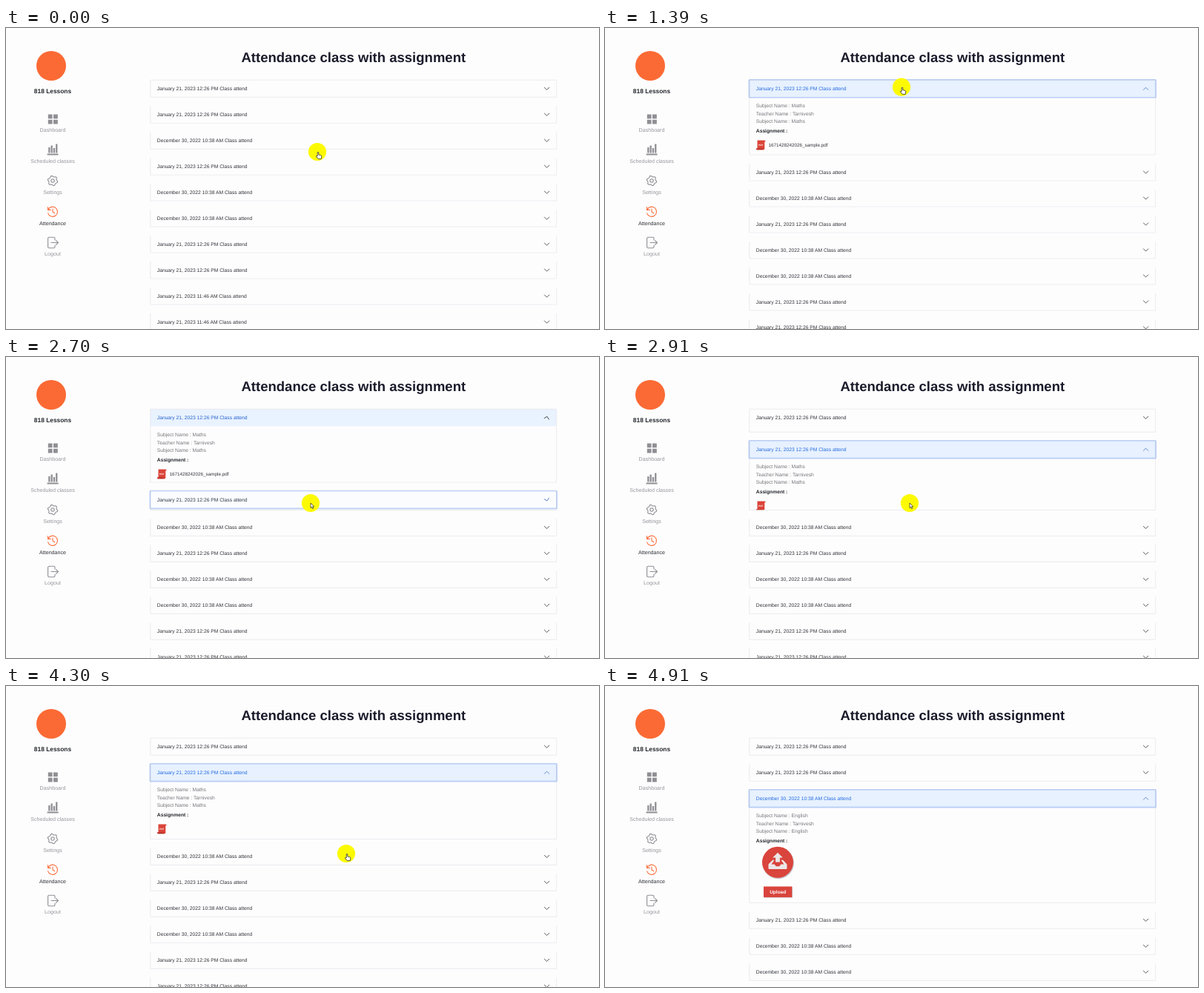
An HTML page that plays this animation: 800 px wide and 406 px high, repeating every 5 s.

```html
<!DOCTYPE html>
<html lang="en">
<head>
<meta charset="utf-8">
<title>Attendance</title>
<style>
  html, body { margin: 0; width: 100%; height: 100%; overflow: hidden; background: #fefdfe; }
  #stage { display: block; width: 100vw; height: 100vh; }
  text { font-family: "Liberation Sans", Arial, sans-serif; font-size: 6.72px; text-rendering: geometricPrecision; }
  .bold { font-weight: bold; fill: #24282c; }
  .mid { text-anchor: middle; }
  .nav text { font-size: 7.14px; text-anchor: middle; fill: #95959a; }
  .nav .active { fill: #2c3034; }
  .solid { fill: #8f8f94; }
  .line { fill: none; stroke: #8f8f94; stroke-width: 1.1; stroke-linecap: round; stroke-linejoin: round; }
  .hot { stroke: #fb6f3c; }
  .border { fill: none; stroke: #e4e4e8; stroke-width: .7; }
  .ring { fill: none; stroke: #2f6fdc; stroke-opacity: .32; stroke-width: 1.6; }
  .chevron { fill: none; stroke-width: .85; stroke-linecap: round; stroke-linejoin: round; }
  .detail { fill: #757579; }
</style>
</head>
<body>
<svg id="stage" viewBox="0 0 800 406">
  <rect width="800" height="406" fill="#fefdfe"/>
  <circle cx="61" cy="51" r="20" fill="#fb6a34"/>
  <text class="bold mid" x="63" y="88" style="font-size:8.4px">818 Lessons</text>
  <text class="bold mid" x="468.8" y="45.8" style="font-size:18.55px;fill:#1b1b2b">Attendance class with assignment</text>

  <g class="nav">
    <path class="solid" d="M56.8 116.5h5.8v5.8h-5.8zM64 116.5h5.8v5.8h-5.8zM56.8 123.7h5.8v5.8h-5.8zM64 123.7h5.8v5.8h-5.8z"/>
    <text x="63" y="140.1">Dashboard</text>
    <path class="solid" d="M55.6 169.6h15v2h-15zM57.2 161h2.3v7.6h-2.3zM60.5 158.5h2.3v10.1h-2.3zM63.8 162h2.3v6.6h-2.3zM67.1 156.5h2.3v12.1h-2.3z"/>
    <text x="63" y="182">Scheduled classes</text>
    <path id="gear" class="line"/>
    <circle class="line" cx="63" cy="206" r="2.2"/>
    <text x="63" y="223.7">Settings</text>
    <path class="line hot" d="M56.8 245.2a6.6 6.6 0 1 1-.2 4.6M56.5 241.6v3.8h3.8M63 244v4l2.8 1.7"/>
    <text class="active" x="63" y="265.5">Attendance</text>
    <path class="line" d="M66 286v-2.2q0-1.6-1.6-1.6h-6.2q-1.6 0-1.6 1.6v11.4q0 1.6 1.6 1.6h6.2q1.6 0 1.6-1.6V293M61 289.5h9.4M67.6 286.7l2.8 2.8-2.8 2.8"/>
    <text x="63" y="307.2">Logout</text>
  </g>

  <g id="list"></g>

  <g id="cursor">
    <circle r="12.1" fill="#fcfa02"/>
    <path id="hand" fill="#fff" stroke="#222" stroke-width=".75" stroke-linejoin="round"
      d="M.2.8q.9-.9 1.6 0V4l3 .7q1.1.3 1 1.5L5.2 9.6H1.3L-1.7 6q.1-1.2 1.9-.1z"/>
    <path id="arrow" fill="#fff" stroke="#222" stroke-width=".7" stroke-linejoin="round"
      d="M0 0v6.6l1.5-1.4 1.1 2.5 1.1-.5-1.1-2.4h2z"/>
  </g>
</svg>

<script>
const $ = id => document.getElementById(id);
const LEFT = 194.8, RIGHT = 742.7, TOP = 70.2, PITCH = 34.97, HEAD = 23.1;
const JAN = "January 21, 2023 12:26 PM", DEC = "December 30, 2022 10:38 AM", EARLY = "January 21, 2023 11:46 AM";
const dates = [JAN, JAN, DEC, JAN, DEC, DEC, JAN, JAN, EARLY, EARLY];

// Clicks by tick of 100 ms; the panels start to move shortly after each
const clicks = [10, 26, 44];
const LAG = 83;
const panelHeights = [78.2, 78.2, 129.1];

const path = [
  [0, 420, 167], [1, 421, 165], [2, 414, 143], [3, 394, 104], [4, 379, 74], [5, 391, 75], [6, 401, 78.5],
  [8, 400, 79.7], [15, 400, 79.7], [16, 403, 96], [17, 409, 128], [18, 412, 153], [19, 412, 171], [21, 412, 190],
  [24, 411, 197], [31, 411, 197], [32, 424, 230], [33, 452, 300], [34, 470, 341], [35, 477, 374], [37, 475, 394],
  [38, 474, 391], [40, 463, 330], [42, 452, 245], [43, 459, 226], [49, 459, 226]
];

const details = subject => `
  <text class="detail" x="203.8" y="13.8">Subject Name : ${subject}</text>
  <text class="detail" x="203.8" y="24.3">Teacher Name : Tarnivesh</text>
  <text class="detail" x="203.8" y="34.9">Subject Name : ${subject}</text>
  <text class="bold" x="203.8" y="47.8">Assignment :</text>`;

const pdf = `
  <path fill="#db4338" d="M205.5 58.2h10q1.3 0 1 1.8h-1.2v9.4q0 1.6-1.6 1.6h-8.6q-1.3 0-1.1-1.8h1.5z"/>
  <path fill="#b3302a" d="M204 69.2h8.5q0 1.8 1.2 1.8h-8.6q-1.3 0-1.1-1.8z"/>
  <text x="207" y="66" style="font-size:3.2px;font-weight:bold;fill:#fff">PDF</text>`;

const fileName = `<text x="220.6" y="66.3" fill="#2f3337" style="font-size:6.3px">1671428242026_sample.pdf</text>`;

const upload = `
  <circle cx="233.7" cy="75.6" r="21.3" fill="#c9c9ce"/>
  <circle cx="233" cy="74.5" r="21" fill="#d9443c"/>
  <path fill="#ece8e8" d="M233 61.5l6.8 6.8h-3.9v6h-5.8v-6h-3.9z
    M226 71.5h2.5l-4 5.8h4.2l2 2.7h4.6l2-2.7h4.2l-4-5.8h2.5l5.5 5.8v5.2q0 1.2-1.2 1.2h-22.6q-1.2 0-1.2-1.2v-5.2z"/>
  <rect x="214.7" y="108" width="38.3" height="14.4" fill="#c9c9ce"/>
  <rect x="214" y="107.2" width="38.3" height="14.5" fill="#d9443c"/>
  <text class="mid" x="233.2" y="116.8" style="font-size:6.5px;font-weight:bold;fill:#fff">Upload</text>`;

const bodies = [details("Maths") + pdf + fileName, details("Maths") + pdf, details("English") + upload];

$("gear").setAttribute("d", "M" + Array.from({ length: 24 }, (_, i) => {
  const a = (i + .5) * Math.PI / 12, r = i % 4 < 2 ? 6.7 : 5.4;
  return `${63 + r * Math.sin(a)} ${206 + r * Math.cos(a)}`;
}).join("L") + "Z");

$("list").innerHTML = dates.map((date, i) => `<g>
  <rect class="fill" x="${LEFT}" width="${RIGHT - LEFT}" height="${HEAD}" fill="#e7f1ff"/>
  <svg class="body" y="${HEAD}" width="800" height="0" overflow="hidden">${bodies[i] || ""}</svg>
  <path class="border"/>
  <rect class="ring" x="${LEFT - .4}" y="-.4" width="${RIGHT - LEFT + .8}" height="${HEAD + .8}" rx=".8"/>
  <text class="label" x="203.8" y="13.7">${date} Class attend</text>
  <path class="chevron" d="M-3.2-1.6L0 1.6 3.2-1.6"/>
</g>`).join("");

const rows = [...$("list").children].map(group => {
  const row = { group };
  for (const name of ["fill", "body", "border", "ring", "label", "chevron"]) row[name] = group.querySelector("." + name);
  return row;
});

// The CSS "ease" curve, solved by bisection
function ease(x) {
  if (x <= 0) return 0;
  if (x >= 1) return 1;
  const bezier = (p, q, u) => 3 * p * u * (1 - u) ** 2 + 3 * q * u * u * (1 - u) + u ** 3;
  let low = 0, high = 1;
  for (let k = 0; k < 24; k++) {
    const u = (low + high) / 2;
    if (bezier(.25, .25, u) < x) low = u; else high = u;
  }
  return bezier(.1, 1, low);
}

const mix = (a, b, k) => `rgb(${a.map((v, i) => Math.round(v + (b[i] - v) * k))})`;
const DARK = [47, 51, 55], BLUE = [36, 107, 222];

function drawRows(tick) {
  const now = tick * 100;
  let y = TOP;
  rows.forEach((row, i) => {
    const start = clicks[i] * 100 + LAG, end = clicks[i + 1] * 100 + LAG;
    const level = ms => i > 2 ? 0 : ease((now - start) / ms) - (end ? ease((now - end) / ms) : 0);
    const height = (panelHeights[i] || 0) * level(350);
    const focused = tick >= clicks[i] && !(tick >= clicks[i + 1]);
    const active = now >= start && !(now >= end);
    const bottom = HEAD + height;

    row.group.setAttribute("transform", `translate(0 ${y})`);
    row.fill.setAttribute("opacity", level(150));
    row.body.setAttribute("height", height);
    row.border.setAttribute("d", `M${LEFT} 0V${bottom}H${RIGHT}V0` + (i ? "" : "Z"));
    row.ring.setAttribute("opacity", focused ? ease((now - clicks[i] * 100 + 40) / 150) : 0);
    row.label.setAttribute("fill", mix(DARK, BLUE, level(150)));
    row.chevron.setAttribute("stroke", active ? "#4c79c4" : "#3b3f43");
    row.chevron.setAttribute("transform", `translate(729.6 11.6) rotate(${-180 * level(200)})`);
    y += PITCH + height;
  });
}

function drawCursor(tick) {
  const next = Math.max(1, path.findIndex(p => p[0] >= tick));
  const [t0, x0, y0] = path[next - 1], [t1, x1, y1] = path[next];
  const k = (tick - t0) / (t1 - t0);
  const pointing = tick >= 17 && tick <= 31;
  $("cursor").setAttribute("transform", `translate(${x0 + (x1 - x0) * k} ${y0 + (y1 - y0) * k})`);
  $("cursor").setAttribute("visibility", tick < 48 ? "visible" : "hidden");
  $("arrow").setAttribute("opacity", pointing ? 1 : 0);
  $("hand").setAttribute("opacity", pointing ? 0 : 1);
}

function draw() {
  const tick = Math.min(49, Math.floor((performance.now() % 5000 + 12) / 100));
  drawRows(tick);
  drawCursor(tick);
  requestAnimationFrame(draw);
}
draw();
</script>
</body>
</html>
```
